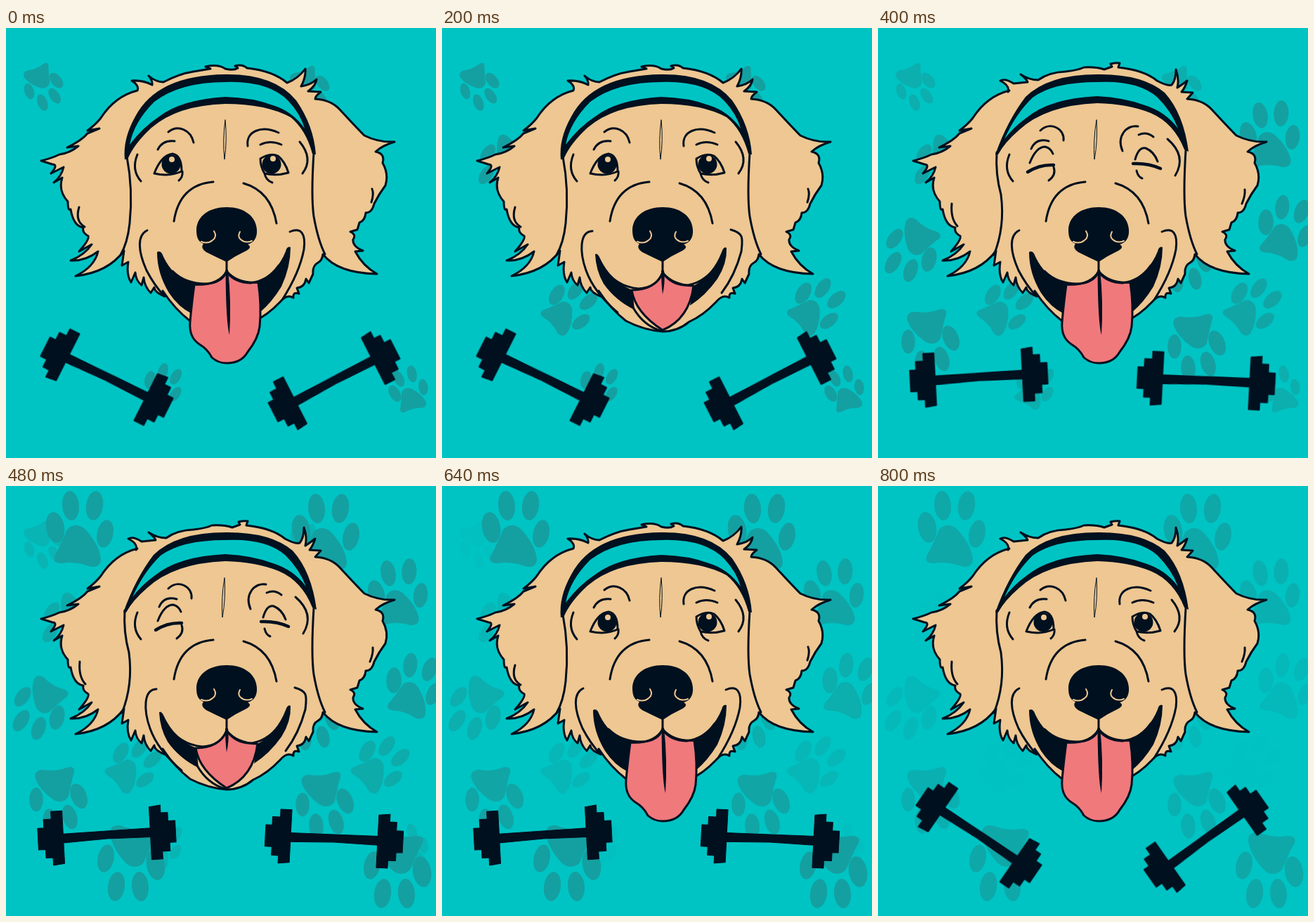
These frames come from a looping animation (612x612 px, 840 ms). An HTML page:

```html
<!DOCTYPE html>
<html lang="en">
<head>
<meta charset="utf-8">
<title>Happy gym dog</title>
<style>
  html, body { margin: 0; width: 100%; height: 100%; overflow: hidden; background: #00c4c4; }
  svg { display: block; width: 100%; height: 100%; }
  .line { fill: none; stroke: #00101f; stroke-width: 3; stroke-linecap: round; stroke-linejoin: round; }
  .thick { stroke-width: 4.5; }
  .ink { fill: #00101f; }
  .fur { fill: #eec792; }
  .tongue { fill: #f0797c; }
  .teal { fill: #00c4c4; }
  .paw { fill: #14a0a1; }
</style>
</head>
<body>
<svg viewBox="0 0 612 612">
  <defs>
    <g id="paw">
      <ellipse rx="13" ry="22" transform="translate(-35 -3) rotate(-10)"/>
      <ellipse rx="12" ry="21" transform="translate(-13 -34) rotate(-5)"/>
      <ellipse rx="12" ry="21" transform="translate(21 -34) rotate(8)"/>
      <ellipse rx="11.5" ry="20" transform="translate(36 6) rotate(12)"/>
      <path d="M-18 0C-10 -9 2 -7 9 1Q28 22 30 42Q30 54 16 53Q-2 46 -18 47Q-40 51 -36 38Q-29 26 -18 0Z"/>
    </g>
    <g id="dumbbell" class="ink" stroke="#00101f" stroke-linejoin="round">
      <path d="M-70 -5L0 -6L70 -7V6L0 5L-70 8Z"/>
      <path id="plates" d="M62 -37L78 -39V-28H88V-16H98V15H89V27H78V38H62Z"/>
      <use href="#plates" transform="rotate(180)"/>
    </g>
  </defs>

  <g id="paws"></g>
  <use id="leftBell" href="#dumbbell"/>
  <use id="rightBell" href="#dumbbell"/>

  <g id="heads"></g>

  <!-- muzzle and temple -->
  <g class="line">
    <path d="M239 275Q247 223 295 219M338 221Q377 232 385 278"/>
    <path d="M187 180Q178 202 192 218"/>
  </g>

  <g id="tongueOut">
    <path class="line" d="M201 288C186 295 188 318 200 345Q211 366 224 380M404 290C420 283 427 293 424 315Q418 348 393 387"/>
    <path class="ink" d="M215 319Q219 316 222 321Q233 347 252 357L270 364L265 407Q245 397 232 377Q215 349 215 319ZM405 312Q400 310 398 318Q386 348 357 362L361 405Q378 391 392 368Q405 340 405 312Z"/>
    <path class="line" style="fill:#f0797c" d="M268 365Q264 395 262 418Q260 440 275 450Q287 457 293 469Q302 477 314 477Q335 477 344 461Q359 442 361 425Q364 395 359 362Q329 364 314 346Q303 367 268 365Z"/>
    <path class="line" d="M314 332V347Q307 363 285 364Q255 364 237 346M314 347Q325 362 348 363Q374 359 388 338"/>
    <path class="ink" d="M312.500 344H316Q321 390 318 437Q313 420 312.500 344Z"/>
  </g>

  <g id="tongueIn">
    <path class="line" d="M214 289C195 290 196 320 205 345Q216 376 250 405M411 287C430 292 428 300 426 318Q417 352 398 377"/>
    <path class="ink" d="M218 322Q221 320 224 326Q240 361 271 373L274 401Q247 388 230 364Q219 345 218 322ZM405 313Q401 310 398 319Q385 352 358 367L353 395Q375 381 392 357Q406 335 405 313Z"/>
    <path class="line" style="fill:#f0797c" d="M270 373Q275 405 314 430Q352 414 358 367Q328 366 314 348Q304 373 270 373Z"/>
    <path class="line" d="M314 332V348Q306 369 280 371Q246 368 228 338M314 348Q327 367 350 366Q377 361 393 334M272 398Q287 424 312 431"/>
    <path class="ink" d="M312 345H316Q318 362 314 379Q312 364 312 345Z"/>
  </g>

  <!-- nose -->
  <path class="ink" d="M271 287C272 267 290 255 314 255C339 255 356 268 357 287C358 299 352 306 344 308Q351 312 342 317Q327 324 314 333Q299 326 285 319Q276 313 281 307C273 304 271 297 271 287Z"/>
  <path class="line" style="stroke:#eec792;stroke-width:2" d="M278 304Q287 308 294 302Q301 297 296 289M350 303Q341 307 334 301Q329 297 333 290"/>

  <g id="eyesOpen">
    <path class="line" d="M231 148C245 137 263 145 267 163M216 173Q223 159 240 161M344 168C341 147 363 138 388 149M362 166Q376 159 392 166M418 162Q438 186 422 207"/>
    <path class="line" d="M211 207Q221 181 237 179Q250 181 250 204Q233 212 211 207M246 217Q252 212 251 204M362 186Q376 177 387 182Q397 190 402 206Q384 211 368 207Q362 197 362 186M368 207Q370 217 379 220"/>
    <circle class="ink" cx="235" cy="194" r="13.5"/><circle class="ink" cx="378" cy="194" r="13.5"/>
    <circle class="fur" cx="236" cy="187" r="4"/><circle class="fur" cx="380" cy="186" r="4"/>
  </g>

  <g id="eyesHalf">
    <path class="line" d="M231 146C245 136 262 146 264 161M217 172Q224 157 241 160M345 174C340 150 360 134 379 141M364 165Q379 156 393 166M414 160Q439 184 423 208"/>
    <path class="line" d="M218 188Q226 172 239 173Q247 176 250 185M366 185Q379 174 389 180Q395 186 402 198M240 217Q252 212 251 196M368 206Q370 214 377 216"/>
    <path class="ink" d="M214 200Q230 185 252 187L251 194L246 195Q244 205 236 207Q226 211 215 208Q225 205 222 197ZM362 190Q379 180 390 185L403 198Q393 207 378 207Q368 207 367 196Z"/>
    <path class="fur" d="M387 193L398 199L389 203Z"/>
    <circle class="fur" cx="234" cy="191" r="3"/><circle class="fur" cx="379" cy="189" r="3"/>
  </g>

  <g id="eyesClosed" class="line">
    <path d="M231 146C246 132 266 144 264 160M218 172Q225 156 243 161M348 175C339 154 354 137 370 140M371 152Q382 147 392 155M412 158Q440 182 423 210"/>
    <path d="M216 192Q225 169 238 169Q246 171 249 179M366 187Q371 169 381 171Q393 176 398 190M243 217Q254 209 250 198M368 203Q370 212 376 214"/>
    <path class="thick" d="M213 205Q230 194 250 195M363 193Q385 192 402 200"/>
  </g>
</svg>

<script>
const LOOP = 840, STEP = 40, PAW_DELAY = 120;
const $ = id => document.getElementById(id);

// The ears and jaw are shared; the fringe, band and ear folds wobble.
const rightSide = 'Q462 102 475 116Q500 143 510 153Q530 163 553 162Q536 167 526 176Q540 179 536 192Q545 208 540 224' +
  'Q531 236 524 250Q521 263 512 263Q511 274 503 277L500 287L490 290Q499 294 494 301Q493 311 508 317L497 318Q508 339 528 350' +
  'Q472 349 451 322Q450 331 444 334Q436 338 437 350L431 363L427 357Q425 369 414 370L417 378Q408 375 409 384Q400 378 390 390';
const jaw = 'Q372 409 352 418Q335 432 314 432Q287 430 262 417Q240 400 223 374L226 382Q211 376 211 369L206 377Q197 368 196 355' +
  'L193 366Q185 360 184 348L178 362Q171 351 174 333L165 338L168 317';
const leftSide = 'Q145 348 99 353Q126 340 131 318Q113 332 92 331Q112 323 122 308L104 318Q119 301 117 296Q108 291 110 284' +
  'Q96 282 92 258Q88 261 88 247Q74 232 80 213L68 220Q79 211 82 198L64 207Q75 194 66 194L50 189Q66 185 76 180' +
  'Q91 178 103 168L87 170Q108 160 116 150L133 143L116 146Q128 137 135 128Q155 97 187 89';

const heads = [
  {
    fringe: 'M187 89Q190 82 179 75Q195 74 208 81Q209 75 203 68Q213 77 224 77Q247 65 267 62Q285 59 291 58L284 55Q302 51 312 58' +
      'Q324 61 330 57L326 54Q336 51 343 57Q380 61 400 78Q416 72 426 58Q427 70 420 83Q434 81 442 73Q441 82 430 90L448 91Q440 97 440 101',
    band: 'M169 187Q166 158 184 126Q215 67 312 66Q382 65 413 103Q438 139 441 180L436 179Q427 145 405 127Q370 108 312 108Q244 110 207 142Q182 165 173 187Z',
    teal: 'M176 166Q182 134 211 105Q248 77 312 77Q374 75 402 104Q419 122 425 143Q407 118 380 110Q351 99 312 98Q249 102 218 126Q195 141 176 166Z',
    folds: 'M172 183Q181 230 176 278Q173 306 163 323M438 178Q434 240 438 268Q444 302 454 322M104 255Q98 275 112 283M521 229Q524 236 520 248',
    crease: 'M312 131Q315 160 311 187Q308 160 312 131Z'
  },
  {
    fringe: 'M185 91Q188 82 174 75Q181 71 193 79L213 77Q211 72 203 66Q215 74 228 74Q243 63 267 62Q285 60 293 56Q310 55 322 59' +
      'L333 55L331 51Q339 49 344 50L342 56Q379 60 397 75Q412 83 418 81Q424 74 424 59Q429 73 426 85Q435 79 440 75Q437 85 432 91L448 92L440 101',
    band: 'M167 180Q184 132 210 98Q243 66 312 66Q376 65 408 92Q435 122 442 176L436 173Q421 135 388 121Q356 108 312 107Q239 110 201 145Q180 163 171 180Z',
    teal: 'M180 158Q196 122 220 99Q250 77 312 77Q371 74 398 99Q418 119 427 143Q409 119 380 110Q351 99 312 97Q245 100 211 128Q193 141 180 158Z',
    folds: 'M169 177Q167 208 175 237Q181 283 165 323M438 174Q434 240 438 268Q444 302 454 322M105 250Q103 271 113 282M522 230Q523 238 518 250',
    crease: 'M311 131Q313 160 308 187Q306 160 311 131Z'
  }
];
$('heads').innerHTML = heads.map(h => `<g>
  <path class="line" style="fill:#eec792" d="${h.fringe}${rightSide}${jaw}${leftSide}Z"/>
  <path class="line" d="${h.folds}"/>
  <path class="ink" d="${h.band}"/><path class="teal" d="${h.teal}"/>
  <path class="line" style="stroke-width:1" d="${h.crease}"/></g>`).join('');

// Each group appears together: x, y, rotation, scale.
const pawGroups = [
  [[53, 83, 151, .58], [432, 87, 151, .58], [223, 510, 22, .58], [573, 515, -20, .58]],
  [[181, 398, 41, .72], [533, 396, 40, .75], [87, 193, 205, .72]],
  [[48, 316, 204, .8], [580, 285, 12, .83], [438, 333, 172, .75]],
  [[74, 445, 168, .85], [453, 452, 168, .85], [558, 153, -5, .88]],
  [[105, 62, 0, 1], [455, 66, 0, 1], [178, 536, 180, 1], [557, 546, 180, 1]]
];
$('paws').innerHTML = pawGroups.map(group => '<g class="paw">' + group.map(([x, y, turn, size]) =>
  `<use href="#paw" transform="translate(${x} ${y}) rotate(${turn}) scale(${size})"/>`).join('') + '</g>').join('');

const show = (el, on) => el.style.display = on ? '' : 'none';
const within = (t, from, to) => t >= from && t < to;
const place = (id, x, y, angle) => $(id).setAttribute('transform', `translate(${x} ${y}) rotate(${angle})`);

function draw(now) {
  const t = Math.floor(now % LOOP / STEP) * STEP;

  [...$('paws').children].forEach((group, i) => {
    const age = t - i * PAW_DELAY;
    group.style.opacity = age < 0 ? 0 : Math.min(1, Math.max(0, (700 - age) / 480));
  });

  const pose = t < 360 ? 0 : t < 760 ? 1 : 2;
  place('leftBell', 143.5, 497, [26.7, -3, 34.5][pose]);
  place('rightBell', 467, 502, [-27, 3, -35][pose]);

  const wobble = within(t, 360, 640) || t >= 760;
  show($('heads').children[0], !wobble);
  show($('heads').children[1], wobble);

  const closed = within(t, 320, 520);
  const half = within(t, 280, 320) || within(t, 520, 600);
  show($('eyesClosed'), closed);
  show($('eyesHalf'), half);
  show($('eyesOpen'), !closed && !half);

  const tongueIn = within(t, 120, 280) || within(t, 480, 640);
  show($('tongueIn'), tongueIn);
  show($('tongueOut'), !tongueIn);
}

const start = performance.now();
(function tick() {
  draw(performance.now() - start);
  requestAnimationFrame(tick);
})();
</script>
</body>
</html>
```
